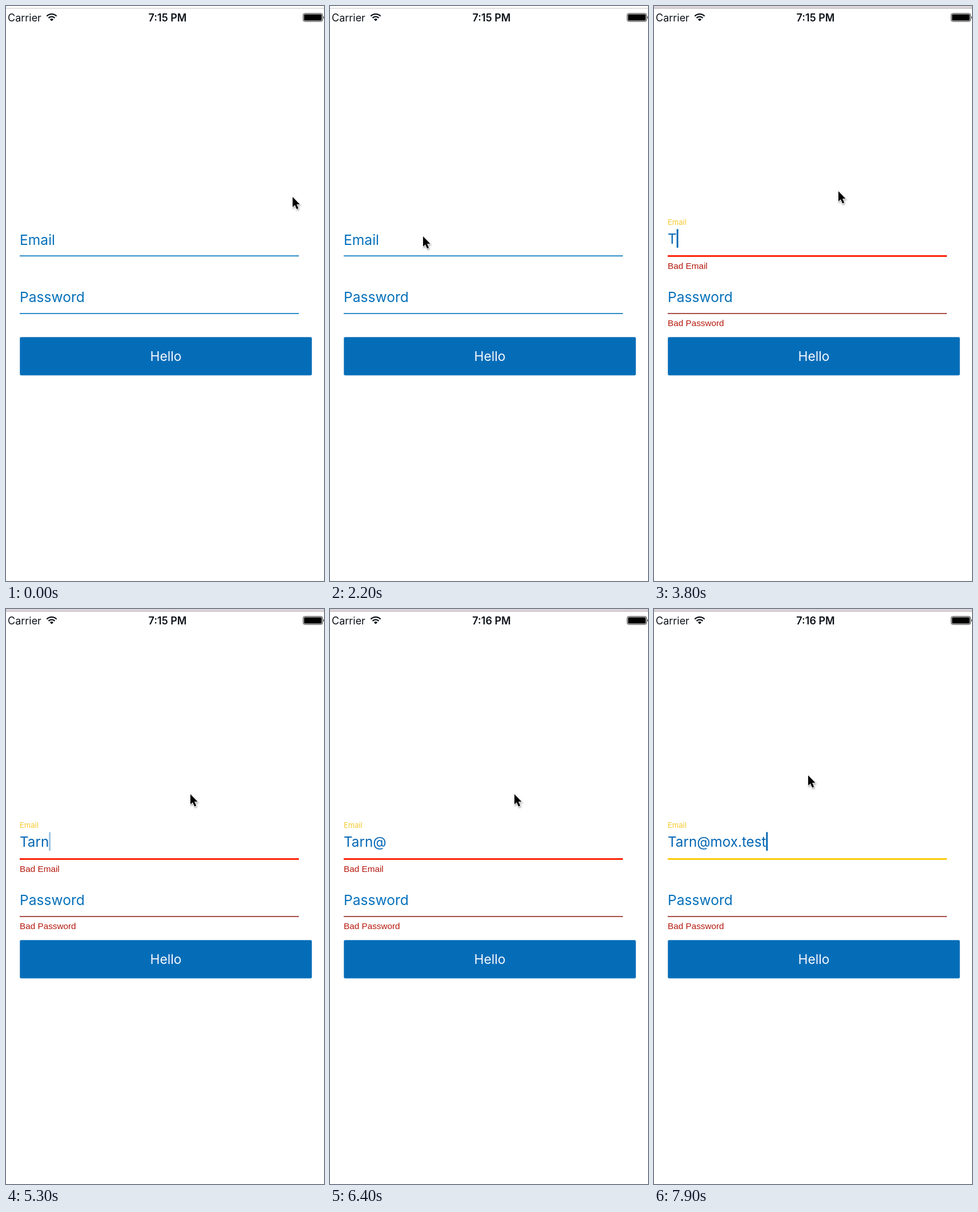
Recreate the animation shown at these times as an HTML page. Size 557 by 1006 pixels, loop 8 s.

```html
<!DOCTYPE html>
<html lang="en">
<head>
<meta charset="utf-8">
<title>Login form</title>
<style>
  html, body { margin: 0; width: 100%; height: 100%; overflow: hidden; background: #fff; }
  svg { display: block; width: 557px; height: 1006px; font-family: Inter, "Open Sans", sans-serif; }
  .field { font-size: 24.6px; fill: #0670bb; }
  .typed { font-size: 24.2px; fill: #0566b5; }
  .status { font-size: 18px; fill: #0c1118; }
  .error { font: 15.3px "Liberation Sans", Arial, sans-serif; fill: #b5190e; }
  #cursor { filter: drop-shadow(1px 2px 1.5px rgba(0, 0, 0, .35)); }
</style>
</head>
<body>
<svg viewBox="0 0 557 1006">
  <rect width="557" height="1006" fill="#fff"/>
  <rect id="bar" width="557" height="4"/>
  <rect id="edge" y="3.5" width="557" height="1.3"/>

  <text class="status" x="3" y="26.7">Carrier</text>
  <g fill="none" stroke="#0c1118" stroke-width="2.3">
    <path d="M71.4 17.7A12.2 12.2 0 0 1 88.6 17.7"/>
    <path d="M74.5 20.9A7.8 7.8 0 0 1 85.5 20.9"/>
    <path d="M80 26.6L76.9 23.4A4.4 4.4 0 0 1 83.1 23.4Z" fill="#0c1118" stroke="none"/>
  </g>
  <text id="clock" class="status" x="283" y="26.7" text-anchor="middle" font-weight="600"></text>
  <rect x="520.5" y="13" width="34" height="14" rx="3" fill="#fff" stroke="#222"/>
  <rect x="522" y="14.5" width="31" height="11" rx="1.6"/>
  <path d="M556 17.5Q558 20 556 22.5Z"/>

  <rect x="24" y="436.4" width="489" height="1.7" fill="#0a7abd"/>
  <rect id="focus" y="436" height="2.8" fill="#ffc800"/>
  <rect id="badLine" x="24" y="436" width="489" height="2.8" fill="#ff1a08"/>
  <text id="label"  x="24">Email</text>
  <text id="typed" class="typed" x="24" y="416.4"></text>
  <rect id="caret" y="390.3" width="2.9" height="32.7" rx=".8" fill="#0566b5"/>
  <text id="badEmail" class="error" x="24" y="459.6">Bad Email</text>

  <text class="field" x="24" y="518.3">Password</text>
  <rect x="24" y="537.2" width="489" height="1.7" fill="#0a7abd"/>
  <g id="badPass">
    <rect x="24" y="537.2" width="489" height="1.7" fill="#bd4632"/>
    <text class="error" x="24" y="560.4">Bad Password</text>
  </g>

  <rect x="24.5" y="579.5" width="511" height="66.5" rx="2" fill="#056db8" stroke="#3d8dc6" stroke-width=".8"/>
  <text x="280" y="621.2" font-size="22.8" fill="#f4f9fd" text-anchor="middle">Hello</text>

  <path id="cursor" d="M0 0V17.8L4 14.2L7.2 21.4L10.2 20.1L7.1 13H12.6Z"
        stroke="#fff" stroke-width="1.6" paint-order="stroke"/>
</svg>
<script>
const LOOP = 8000, STEP = 100, FOCUS = 2400, BAD = 3600, GOOD = 7400, MINUTE = 6000;
const ENTRY = "Tarn@mox.test";
const KEYS = [3600, 4500, 4600, 4700, 5700, 6800, 6900, 7000, 7100, 7200, 7300, 7400, 7500];
const PATH = [ // time, x, y
  [0, 502, 334], [200, 470, 313], [500, 318, 350], [900, 175, 401], [1100, 175, 401],
  [1200, 172, 398], [1600, 163, 403], [2400, 163, 403], [2800, 244, 352],
  [3200, 323, 324], [7700, 323, 324], [7900, 270, 291], [8000, 270, 291]
];

const $ = id => document.getElementById(id);
const set = (id, attrs) => {
  for (const key in attrs) $(id).setAttribute(key, attrs[key]);
};
const clamp = v => Math.min(1, Math.max(0, v));
const ramp = (t, from, to) => clamp((t - from) / (to - from));
const mix = (a, b, p) => a + (b - a) * p;
const smooth = p => p * p * (3 - 2 * p);

function cursorAt(t) {
  const i = Math.max(1, PATH.findIndex(k => k[0] >= t));
  const [t0, x0, y0] = PATH[i - 1], [t1, x1, y1] = PATH[i];
  const p = ramp(t, t0, t1);
  return [mix(x0, x1, p), mix(y0, y1, p)];
}

// The blink restarts with every key press.
function blink(age) {
  const t = age % 1000;
  return t < 800 ? 1 - ramp(t, 450, 700) : ramp(t, 800, 1000);
}

function draw(t) {
  const active = t >= FOCUS;
  set("bar", { fill: active ? "#dcd6d9" : "#fdfdfd" });
  set("edge", { fill: active ? "#c3bdc0" : "#d5d2d3" });
  $("clock").textContent = t < MINUTE ? "7:15 PM" : "7:16 PM";

  const p = ramp(t, FOCUS, FOCUS + 500);
  const rise = smooth(p);
  const tint = [[6, 245], [112, 201], [187, 48]].map(([a, b]) => Math.round(mix(a, b, clamp(p * 2))));
  set("label", { y: mix(418, 383, rise), "font-size": mix(24.6, 13, rise), fill: `rgb(${tint})` });
  const width = 489 * (1 - (1 - p) ** 2.6);
  set("focus", { x: 268.5 - width / 2, width });

  const pass = ramp(t, BAD - 50, BAD + 100);
  const email = pass * (1 - ramp(t, GOOD - 50, GOOD + 100));
  set("badLine", { opacity: email });
  set("badEmail", { opacity: email });
  set("badPass", { opacity: pass });

  const count = KEYS.filter(k => k <= t).length;
  $("typed").textContent = ENTRY.slice(0, count);
  const length = count ? $("typed").getComputedTextLength() : 0.4;
  const last = count ? KEYS[count - 1] : FOCUS;
  set("caret", { x: 24 + length, opacity: active ? blink(t - last) : 0 });

  set("cursor", { transform: `translate(${cursorAt(t)})` });
}

const start = performance.now();
function tick(now) {
  const t = Math.max(0, now - start) % LOOP;
  draw(Math.floor((t + 8) / STEP) * STEP % LOOP);
  requestAnimationFrame(tick);
}
draw(0);
requestAnimationFrame(tick);
</script>
</body>
</html>
```
